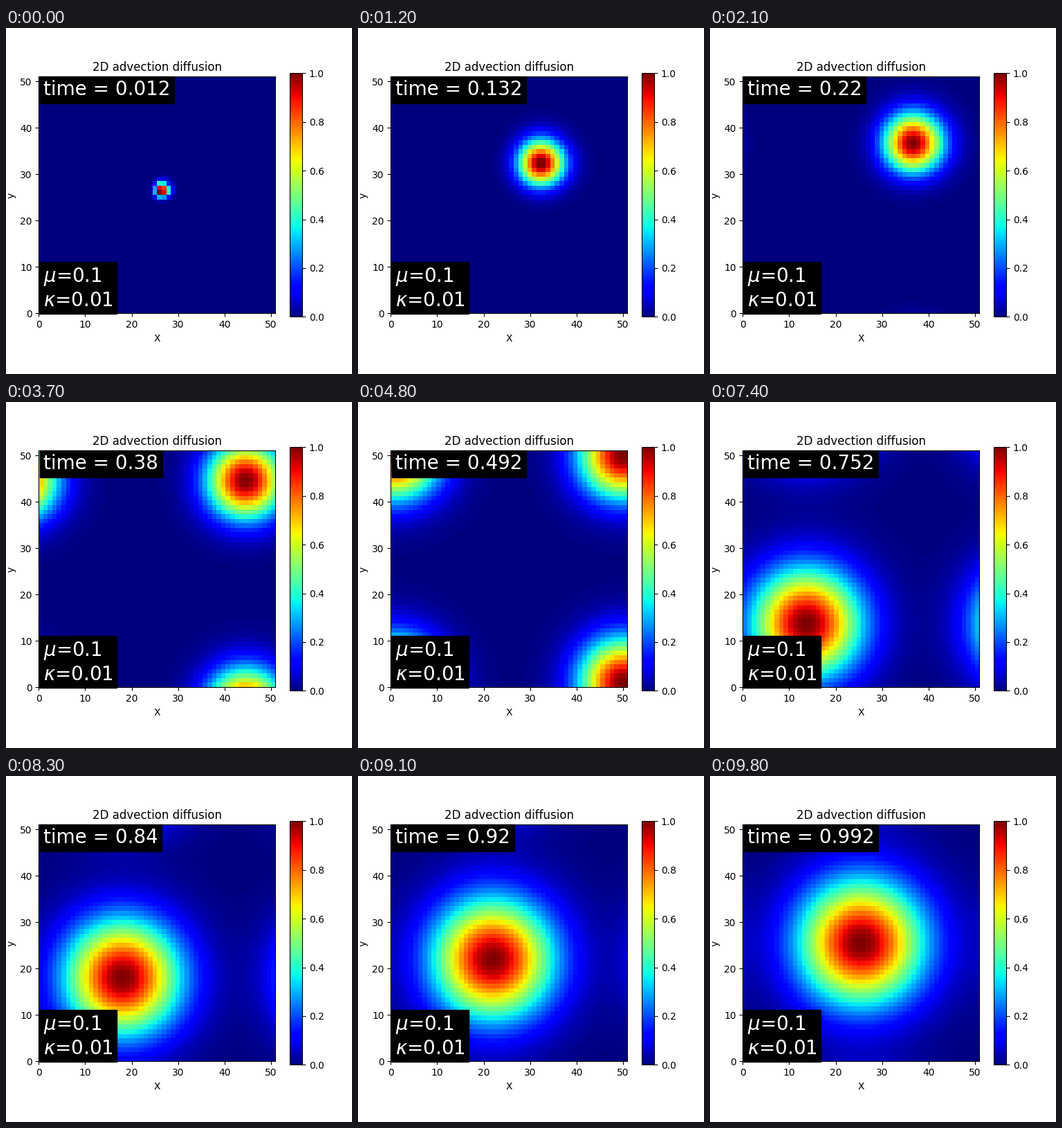
A matplotlib script that plays this animation: 500x500 px, repeating every 9.9 s.

```python
import math

import numpy as np
import matplotlib.pyplot as plt
from matplotlib.animation import FuncAnimation
from matplotlib.patches import Rectangle

SIZE = 500            # stage in pixels
FRAMES = 99
INTERVAL = 100        # ms
CELLS = 50            # periodic cells; one ghost cell on each side is drawn
MU = 0.1              # diffusion number
KAPPA = 0.01
DX = 1 / CELLS
DT = MU * DX**2 / KAPPA
CFL = DT / DX
SPAN = CELLS + 1


def step(p):
    """One explicit diffusion step followed by one upwind advection step."""
    p = p + MU * (np.roll(p, 1) - 2 * p + np.roll(p, -1))
    return p - CFL * (p - np.roll(p, 1))


def step_count(frame):
    return math.ceil((frame + 1) * 0.01 / DT - 1e-6)


def make_profiles():
    # The problem is separable, so a 1D profile per step is enough.
    p = np.zeros(CELLS)
    p[26] = 1
    profiles = [p]
    for _ in range(step_count(FRAMES - 1)):
        profiles.append(step(profiles[-1]))
    return profiles


PROFILES = make_profiles()
DRAWN = np.arange(CELLS + 2) % CELLS


def field(frame):
    p = PROFILES[step_count(frame)][DRAWN]
    return np.outer(p, p) / p.max()**2


def add_axes(left, bottom, width, height):
    return fig.add_axes([v / SIZE for v in (left, bottom, width, height)])


fig = plt.figure(figsize=(SIZE / 100, SIZE / 100), dpi=100)
ax = add_axes(47.4, 87.6, 342, 342)
cax = add_axes(410.4, 82.6, 17.6, 352)

image = ax.imshow(field(0), cmap="jet", vmin=0, vmax=1, origin="lower",
                  extent=[0, SPAN, 0, SPAN], interpolation="nearest",
                  aspect="auto")
fig.colorbar(image, cax=cax)
ax.set_title("2D advection diffusion")
ax.set_xlabel("X")
ax.set_ylabel("y")

# Parameter panel
ax.add_patch(Rectangle((0.12, -0.03), 16.73, 11.1, facecolor="black",
                       edgecolor="black", lw=1, zorder=2.8, clip_on=False))
label = dict(color="white", fontsize=20)
ax.text(1, 6.75, rf"$\mu$={MU}", **label)
ax.text(1, 1.5, rf"$\kappa$={KAPPA}", **label)

clock = ax.text(1, 47, "", bbox=dict(facecolor="black"), **label)


def update(frame):
    image.set_data(field(frame))
    clock.set_text(f"time = {step_count(frame) * DT:.3g}")
    return image, clock


anim = FuncAnimation(fig, update, frames=FRAMES, interval=INTERVAL,
                     repeat=True, repeat_delay=0)
plt.show()
```
